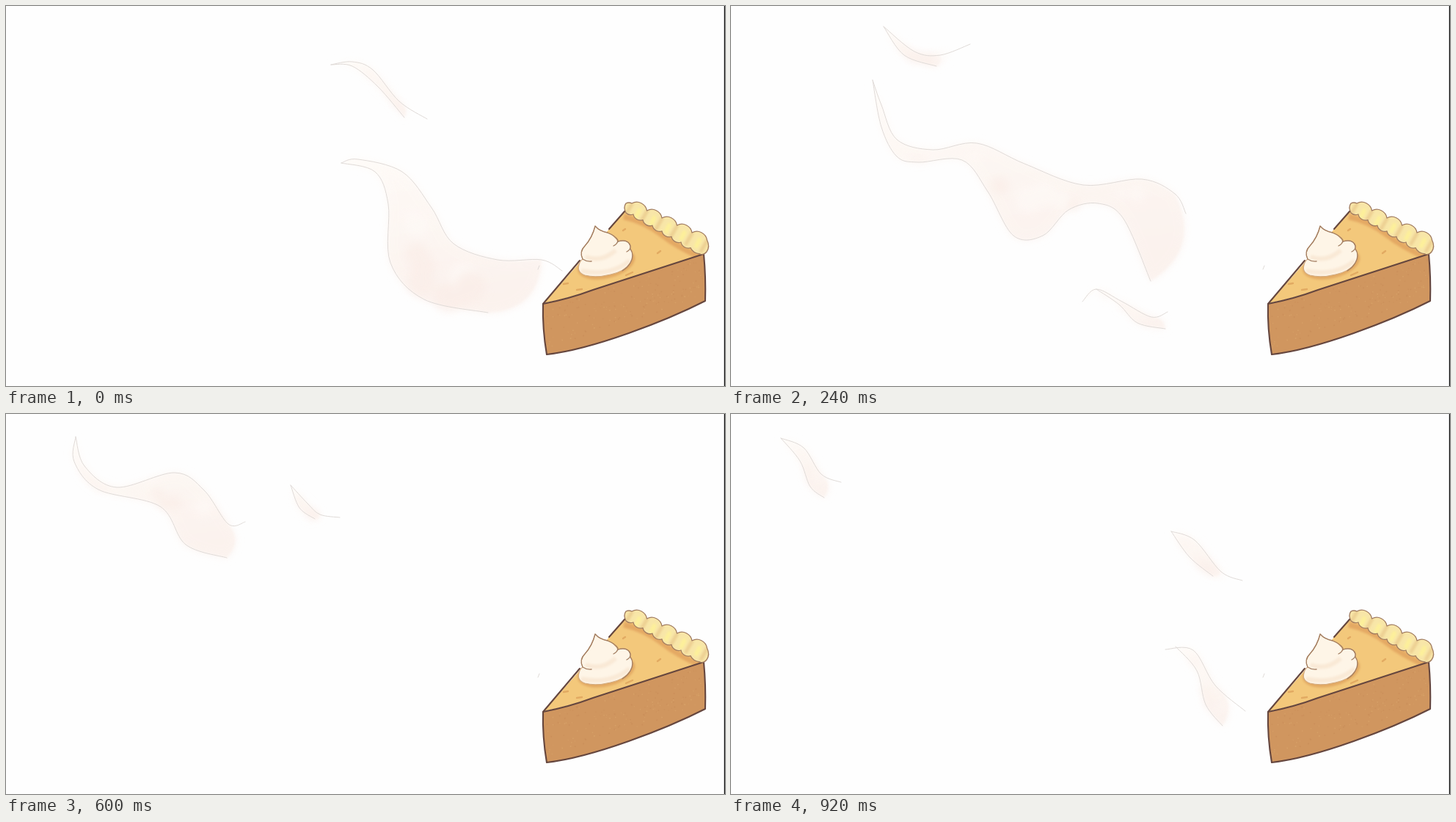
These frames come from a looping animation (980 px wide and 518 px high, 0.96 s). An HTML page:

```html
<!DOCTYPE html>
<html lang="en">
<head>
<meta charset="utf-8">
<title>Warm pie</title>
<style>
  html, body { margin: 0; width: 100%; height: 100%; overflow: hidden; background: #fefefe; }
  svg { display: block; width: 100%; height: 100%; }
  .line { fill: none; stroke: #dfdad7; stroke-width: 1; stroke-linecap: round; }
  .ink { fill: none; stroke: #65463e; stroke-width: 2.1; stroke-linecap: round; stroke-linejoin: round; }
  .thin { stroke: #a17c60; stroke-width: 1.3; }
  .cream { stroke: #d3ab80; stroke-width: 1.1; }
</style>
</head>
<body>
<svg viewBox="0 0 980 518" preserveAspectRatio="none">
  <defs>
    <filter id="halo" filterUnits="userSpaceOnUse" x="0" y="0" width="980" height="518"><feGaussianBlur stdDeviation="6"/></filter>
    <filter id="soft" filterUnits="userSpaceOnUse" x="0" y="0" width="980" height="518"><feGaussianBlur stdDeviation="1.8"/></filter>
    <linearGradient id="steam" x1="0" y1="0" x2=".2" y2="1">
      <stop offset="0" stop-color="#fefaf6"/><stop offset="1" stop-color="#fbf1ec"/>
    </linearGradient>
    <path id="top" d="M845 278L733 405Q765 399 800 387L952 338L938 318L860 276Z"/>
    <path id="side" d="M732 406Q768 399 800 387L951 338Q954 370 953 402C900 429 800 468 737 475Q731 440 732 406Z"/>
    <path id="swirl" d="M803 300Q809 307 820 309Q830 313 834 321Q848 317 851 327L851 331Q857 340 851 350Q843 362 824 366Q804 371 789 367Q778 363 781 353Q782 348 786 345Q781 335 789 327Q799 316 803 300Z"/>
    <path id="crust"/>
    <clipPath id="inTop"><use href="#top"/></clipPath>
    <clipPath id="inSwirl"><use href="#swirl"/></clipPath>
    <clipPath id="inCrust"><use href="#crust"/></clipPath>
  </defs>

  <g id="smoke"></g>
  <path class="line" d="M727 354L725 359"/>

  <g clip-path="url(#inTop)">
    <use href="#top" fill="#f3c87b"/>
    <path d="M842 287Q872 294 893 311T950 344" fill="none" stroke="#e4a963" stroke-width="8" filter="url(#soft)"/>
    <ellipse cx="818" cy="351" rx="40" ry="20" fill="#e2a862" transform="rotate(-14 818 351)" filter="url(#soft)"/>
    <path d="M841 306l3-2M888 337l4-3M760 379l6-1M778 387l7-1M845 367l9-4" stroke="#e2aa62" stroke-width="2.4" stroke-linecap="round"/>
  </g>
  <use href="#side" fill="#d0965f"/>
  <g id="crumbs"></g>
  <path class="ink" d="M844 279L822 304M782 347L732 406"/>
  <use href="#side" class="ink"/>

  <use href="#crust" fill="#f8e6a8"/>
  <g id="folds" clip-path="url(#inCrust)" filter="url(#soft)" stroke-linecap="round"></g>
  <use href="#crust" class="ink thin"/>

  <use href="#swirl" fill="#fef5e7"/>
  <g clip-path="url(#inSwirl)" fill="none" stroke="#f9e9d6" stroke-width="6" filter="url(#soft)">
    <path d="M784 361Q824 369 850 347M790 342Q812 350 831 333"/>
  </g>
  <use href="#swirl" class="ink cream"/>
  <path class="ink thin" d="M786 345Q781 335 789 327Q799 316 803 300Q809 307 820 309Q830 313 834 319Q834 324 828 327M834 321Q848 317 851 327Q852 332 846 335M851 331Q857 340 851 350Q847 357 840 361M786 345Q792 349 798 348"/>
  <path d="M979.4 0V518" stroke="#111" stroke-width="1.2"/>
</svg>

<script>
const LOOP = 960;
const $ = id => document.getElementById(id);

let seed = 7;
const rand = () => (seed = seed * 16807 % 2147483647) / 2147483647;

function add(parent, tag, attrs) {
  const el = document.createElementNS('http://www.w3.org/2000/svg', tag);
  for (const k in attrs) el.setAttribute(k, attrs[k]);
  return parent.appendChild(el);
}

const points = s => s.split(' ').map(p => p.split(',').map(Number));

// Smooth curve through all points.
function curve(p, start = 'M') {
  let d = start + p[0];
  for (let i = 0; i < p.length - 1; i++) {
    const a = p[i - 1] || p[i], b = p[i], c = p[i + 1], e = p[i + 2] || c;
    const lead = [0, 1].map(n => b[n] + (c[n] - a[n]) / 6);
    const trail = [0, 1].map(n => c[n] - (e[n] - b[n]) / 6);
    d += `C${lead} ${trail} ${c}`;
  }
  return d;
}

// Four poses of steam; each wisp is a pair of edges given by key points.
const poses = [
  [
    ['443,80 472,76 500,87 536,130 574,154', '443,80 472,82 507,110 543,152'],
    ['457,214 480,209 540,226 580,275 610,324 670,346 730,346 758,361',
     '457,214 503,226 521,270 524,350 570,400 657,418']
  ],
  [
    ['208,28 250,62 285,67 326,52', '208,28 236,67 280,82'],
    ['193,101 205,135 226,182 275,196 335,187 400,215 480,244 560,236 605,256 620,283',
     '193,101 205,165 226,205 255,213 315,210 350,253 385,313 425,313 460,278 500,269 535,290 572,375'],
    ['479,403 498,386 533,403 573,424 595,417', '498,386 529,407 554,432 592,440']
  ],
  [
    ['95,31 107,71 151,100 230,80 270,104 303,150 326,147',
     '95,31 93,65 126,103 210,126 245,178 301,196'],
    ['388,97 411,122 428,137 455,141', '388,97 400,128 421,143']
  ],
  [
    ['68,33 99,46 123,82 150,93', '68,33 94,64 108,99 127,114'],
    ['600,160 632,172 668,215 697,227', '600,160 625,195 657,221'],
    ['592,321 630,322 660,370 701,405', '606,317 635,350 647,396 670,425']
  ]
];

// Closes the two edges with a rounded open end.
function bodyPath(top, low) {
  const a = top[top.length - 2], b = low[low.length - 1];
  const dx = b[0] - a[0], dy = b[1] - a[1];
  const bulge = [(a[0] + b[0]) / 2 + dy * .45, (a[1] + b[1]) / 2 - dx * .45];
  return curve(top.slice(0, -1)) + `Q${bulge} ${b}` + curve(low.slice().reverse(), 'L') + 'Z';
}

function drawWisp(g, edges) {
  const [top, low] = edges.map(points);
  const d = bodyPath(top, low);
  add(g, 'path', { d, fill: 'url(#steam)', filter: 'url(#halo)', opacity: .7 });
  add(g, 'path', { d, fill: 'url(#steam)', filter: 'url(#soft)', opacity: .75 });
  const wash = add(g, 'g', { filter: 'url(#halo)', opacity: .6 });
  const [upper, lower] = [top, low].map(p => add(g, 'path', { d: curve(p), class: 'line' }));

  // Watercolour blots between the edges, pink low and white high.
  const at = (path, u) => path.getPointAtLength(u * path.getTotalLength());
  for (let i = 0; i < 12; i++) {
    const u = .15 + .7 * rand(), v = .2 + .7 * rand();
    const p = at(upper, u), q = at(lower, u);
    add(wash, 'circle', {
      cx: p.x + (q.x - p.x) * v, cy: p.y + (q.y - p.y) * v,
      r: Math.hypot(q.x - p.x, q.y - p.y) * .18,
      fill: v > .55 ? '#faece6' : '#fefaf7'
    });
  }
}

poses.forEach((wisps, i) => {
  const g = add($('smoke'), 'g', {});
  wisps.forEach(w => drawWisp(g, w));
  const steps = [0, 1, 2, 3, 4].map(n => ({
    offset: n / 4, opacity: n % 4 === i ? 1 : 0, easing: 'step-end'
  }));
  g.animate(steps, { duration: LOOP, iterations: Infinity });
});

// Scalloped crust: big bumps outside, small ones inside.
$('crust').setAttribute('d', 'M845 282Q841 274 845 269Q849 267 853 269' +
  'a14 14 0 0 1 20.5 10'.repeat(5) + 'Q960 328 955 335Q951 340 946 338Q936 337 933 329.6' +
  'a10 10 0 0 1 -13 -7.6'.repeat(6) + 'Q849 286 845 282Z');
for (let i = 0; i < 6; i++) {
  const x = 853 + 20.5 * i, y = 270 + 10 * i;
  add($('folds'), 'path', { d: `M${x} ${y}l-8 14`, stroke: '#edd093', 'stroke-width': 5 });
  add($('folds'), 'path', { d: `M${x + 10} ${y + 9}l-4 8`, stroke: '#fdf09a', 'stroke-width': 6 });
}

// Faint crumb texture on the cut side.
for (let i = 0; i < 200; i++) {
  const u = rand(), v = .08 + .84 * rand();
  add($('crumbs'), 'circle', {
    cx: 736 + u * 214, cy: 406 - u * 68 + v * (66 - 4 * u + 12 * u * (1 - u)),
    r: .5 + rand() * .6, fill: i % 2 ? '#dba66c' : '#c88c58', opacity: .6
  });
}
</script>
</body>
</html>
```
